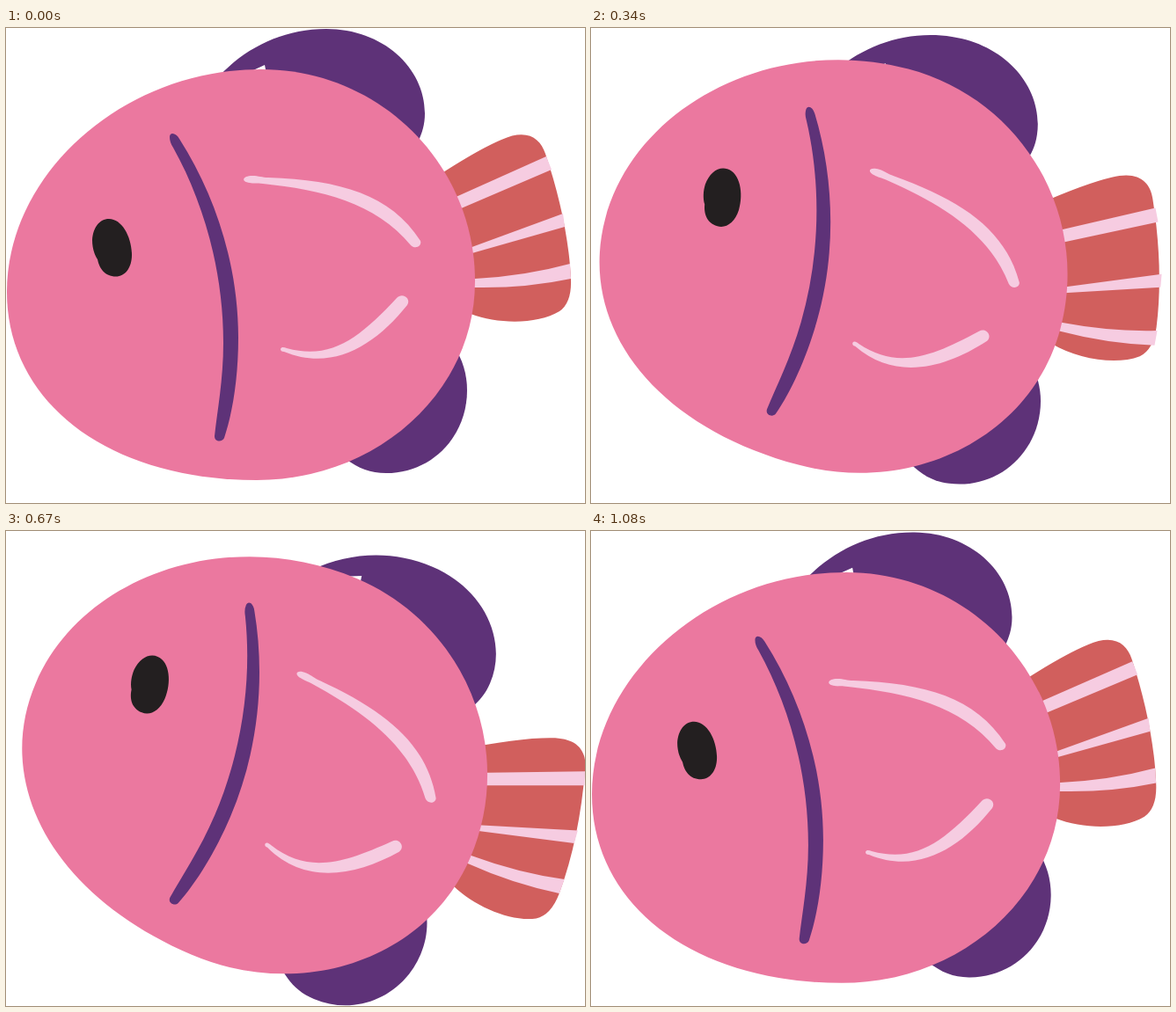
Recreate the animation shown at these times as an HTML page. Size 658 by 540 pixels, loop 1.11 s.

```html
<!DOCTYPE html>
<html lang="en">
<head>
<meta charset="utf-8">
<title>Swaying fish</title>
<style>
  html, body { margin: 0; width: 100%; height: 100%; overflow: hidden; background: #fff; }
  svg { display: block; width: 100%; height: 100%; }
</style>
</head>
<body>
<svg id="fish" viewBox="0 0 658 540" xmlns="http://www.w3.org/2000/svg"></svg>
<script>
const LOOP = 1110;           // ms
const STEPS = 33;            // poses per loop
const HALF = STEPS / 2;
const RISE = 16;             // steps of the forward swing, followed by a short hold
const SWING = 23.5;          // degrees
const STAGGER = 0.3;         // delay between neighbouring layers, in steps
const PIVOT = '327 316.5';

const PINK = '#eb789f', PURPLE = '#5e3278', CORAL = '#d15f5d', PALE = '#f6cce1', BLACK = '#231f20';

// Back to front; the front layer leads the swing.
const layers = [
  // lower fin
  [PURPLE, 'M505 355C518 374 524 392 524 412C524 464 484 506 432 506C414 506 401 501 385 489L440 420Z'],
  // upper fin
  [PURPLE, 'M240 57C270 24 313 1 364 1C428 1 476 45 476 97C476 110 473 119 468 130L400 150L297 57L294 42Q270 53 240 67Z'],
  // tail and its stripes
  [CORAL, 'M470 182Q530 141 563 127C592 114 607 125 613 143C629 190 640 240 642 286Q643 312 629 322C604 337 560 337 528 325L490 310Z'],
  [PALE, 'M480 206L614 146L620 161L480 221Z'],
  [PALE, 'M505 258L633 211L635 226L505 263Z'],
  [PALE, 'M500 286L533 285Q590 282 641 268L642 285Q590 296 533 295L500 294Z'],
  // body
  [PINK, 'M1 300C1 165 134 47 290 47C425 47 533 155 533 288C533 415 420 514 285 514C115 514 1 425 1 300Z'],
  // gill
  [PURPLE, 'M186 124C186 118 193 119 197 126C238 190 264 270 264 352C264 396 258 436 248 466C246 471 237 471 237 464C240 436 247 400 247 358C247 275 224 197 190 136Q186 130 186 124Z'],
  // eye
  [BLACK, 'M117 217C132 217 143 238 143 258C143 273 135 282.5 125 282.5C112 282.5 106 273 104 263C100 257 98 249 98 241C99 227 106 217 117 217Z'],
  // side lines
  [PALE, 'M280 168C287 168 291 170 298 170C380 173 437 189 471 242C473 248 465 252 460 247C420 198 358 184 292 177C285 176 281 177 277 176C267 175 268 168 280 168Z'],
  [PALE, 'M312 365C313 362 316 363 319 364C370 378 402 352 444 307C450 300 461 307 456 315C420 360 372 391 316 368Q312 368 312 365Z']
];

const svg = document.getElementById('fish');
const paths = layers.map(([fill, d]) => {
  const path = document.createElementNS(svg.namespaceURI, 'path');
  path.setAttribute('fill', fill);
  path.setAttribute('d', d);
  return svg.appendChild(path);
});

const easeInOut = p => p < 0.5 ? 4 * p ** 3 : 1 - 4 * (1 - p) ** 3;

function swing(step) {
  const s = (step + STEPS) % STEPS;
  return SWING * (s < HALF ? easeInOut(Math.min(s / RISE, 1)) : 1 - easeInOut(s / HALF - 1));
}

function draw(time) {
  const step = Math.floor((time % LOOP) / LOOP * STEPS + 0.12) % STEPS;
  paths.forEach((path, i) => {
    const delay = STAGGER * (paths.length - 1 - i);
    const angle = swing(step - delay) - swing(-delay);
    path.setAttribute('transform', `rotate(${angle.toFixed(3)} ${PIVOT})`);
  });
}

const start = performance.now();
function tick() {
  draw(performance.now() - start);
  requestAnimationFrame(tick);
}
tick();
</script>
</body>
</html>
```
